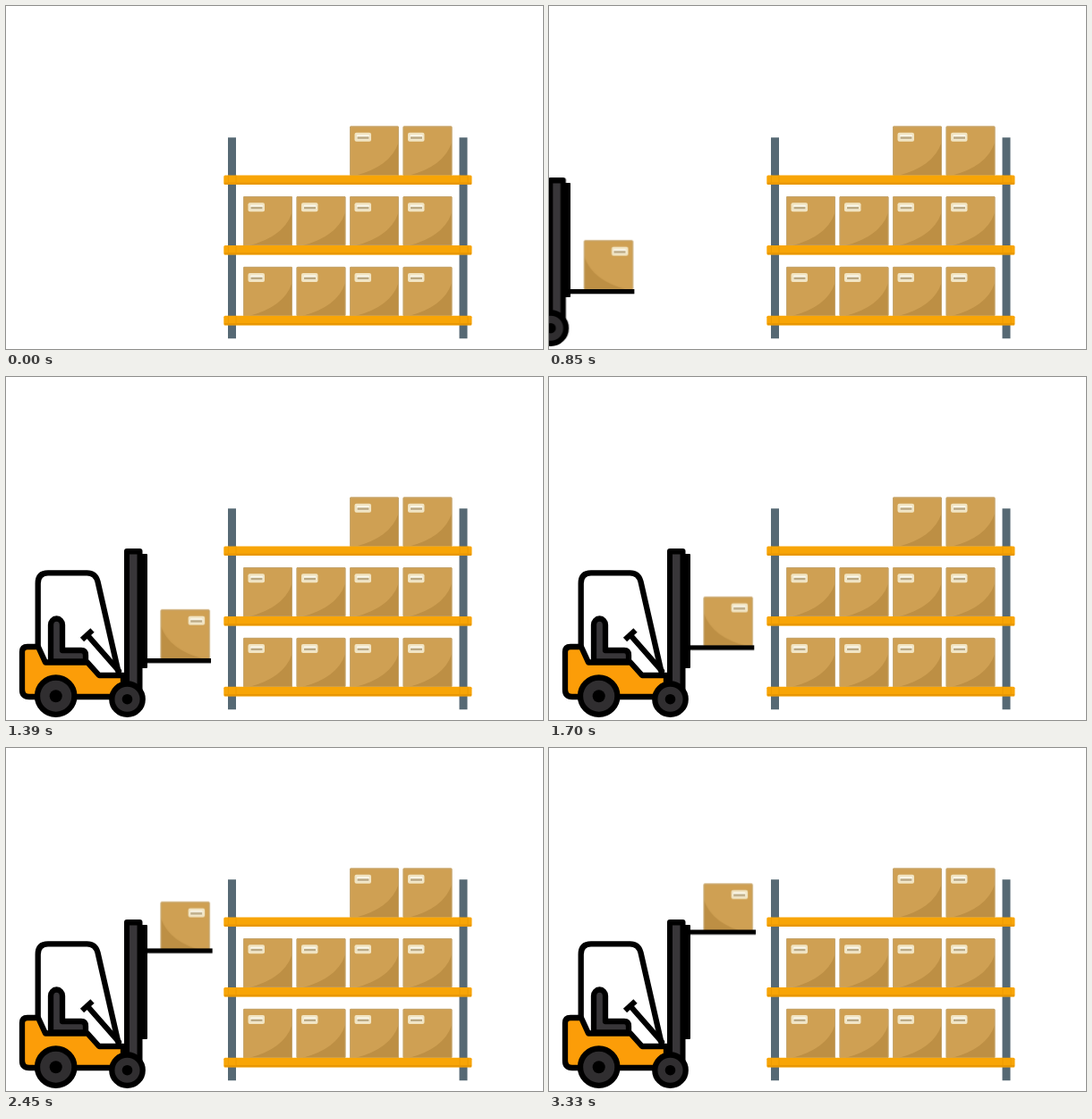
These frames come from a looping animation (600 by 384 pixels, 3360 ms). An HTML page:

```html
<!DOCTYPE html>
<html lang="en">
<head>
<meta charset="utf-8">
<title>Forklift and shelf</title>
<style>
  html, body { margin: 0; width: 100%; height: 100%; overflow: hidden; background: #fff; }
  svg { display: block; width: 600px; height: 384px; }

  .truck { animation: drive 3360ms linear infinite; }
  .load, .fork { animation: lift 3360ms linear infinite; }
  .load { --up: translateY(-110.5px); --half: translateY(-55.25px); }
  .fork {
    --up: translateY(-113.5px) scaleX(1.028);
    --half: translateY(-56.75px) scaleX(1.014);
    transform-origin: 157px 320px;
  }

  @keyframes drive {
    0%, 17.08% { transform: translateX(-280px); }
    32.86%, 100% { transform: none; }
  }
  /* quadratic ease in, then out */
  @keyframes lift {
    0% { transform: translateY(0) scaleX(1); }
    36.43% {
      transform: translateY(0) scaleX(1);
      animation-timing-function: cubic-bezier(.3333, 0, .6667, .3333);
    }
    62.65% {
      transform: var(--half);
      animation-timing-function: cubic-bezier(.3333, .6667, .6667, 1);
    }
    88.84%, 100% { transform: var(--up); }
  }

  .line { fill: none; stroke: #000; stroke-width: 6.3; stroke-linejoin: round; stroke-linecap: round; }
  .flat { stroke-linecap: butt; }
  .dark { fill: #383639; }
  .tyre { fill: #302e30; }
  .body { fill: #fc9d08; }
</style>
</head>
<body>
<svg viewBox="0 0 600 384">
  <defs>
    <g id="box">
      <rect x="-.4" y="-.4" width="54.800" height="55.400" rx="1.200" fill="#cfa053"/>
      <path d="M54 18Q45 45 5 55H54Z" fill="#bd8f44"/>
      <rect x="0" y="0" width="54" height="54.500" rx="1" fill="none" stroke="#c3a673" stroke-width=".9"/>
      <rect x="5" y="6.800" width="18.500" height="10" rx="2" fill="#f1e4c2"/>
      <rect x="7.500" y="9.300" width="14" height="5" rx="1" fill="#fbf8ec"/>
      <rect x="8" y="11.300" width="13" height="2.500" fill="#bba983"/>
    </g>
    <g id="board">
      <rect x="243.300" width="277.200" height="10.600" rx="1.500" fill="#f8a506"/>
      <rect x="244" y="8.200" width="276" height="2.200" fill="#e89704"/>
      <path d="M248.500 0V10M257 0V10M507 0V10M516 0V10" stroke="#ed9b00" stroke-width=".8"/>
    </g>
    <g id="row">
      <use href="#box" x="384.500"/>
      <use href="#box" x="444"/>
    </g>
  </defs>

  <g class="shelf">
    <path d="M248 147.300h9V372.200h-9ZM506.500 147.300h9V372.200h-9Z" fill="#566974"/>
    <use href="#row" y="135"/>
    <use href="#row" y="213.500"/>
    <use href="#row" x="-119" y="213.500"/>
    <use href="#row" y="292.300"/>
    <use href="#row" x="-119" y="292.300"/>
    <use href="#board" y="189.400"/>
    <use href="#board" y="267.900"/>
    <use href="#board" y="346.800"/>
  </g>

  <g class="truck">
    <g class="load"><use href="#box" transform="translate(227.200 262.800) scale(-1 1)"/></g>
    <rect class="fork" x="156" y="317" width="73" height="5.300"/>

    <path class="line" d="M35.700 303V231Q35.700 219.300 47 219.300H90.500Q100 219.300 102.500 229L125.500 330"/>
    <path class="line" d="M91 289L126 329"/>
    <path class="line flat" d="M85 294L96.500 283.500"/>

    <path class="line body" d="M24 302H36L44 319.500H91L104 334H131V358H26Q18 358 18 350V308Q18 302 24 302Z"/>
    <path class="line dark" d="M50 318.500V277.500A6.500 7 0 0 1 63 277.500V306H84Q89 306 89 311.500V318.500Z"/>

    <rect x="151" y="198" width="7" height="128" rx="1"/>
    <rect x="132" y="192" width="20.500" height="160" rx="3"/>
    <rect class="dark" x="138" y="198.500" width="8.500" height="148"/>

    <circle class="line tyre" cx="55.700" cy="357.200" r="20.700"/>
    <circle class="line tyre" cx="135.500" cy="360.700" r="17.200"/>
    <circle cx="55.700" cy="357.200" r="7"/>
    <circle cx="135.500" cy="360.700" r="5.800"/>
  </g>
</svg>
</body>
</html>
```
